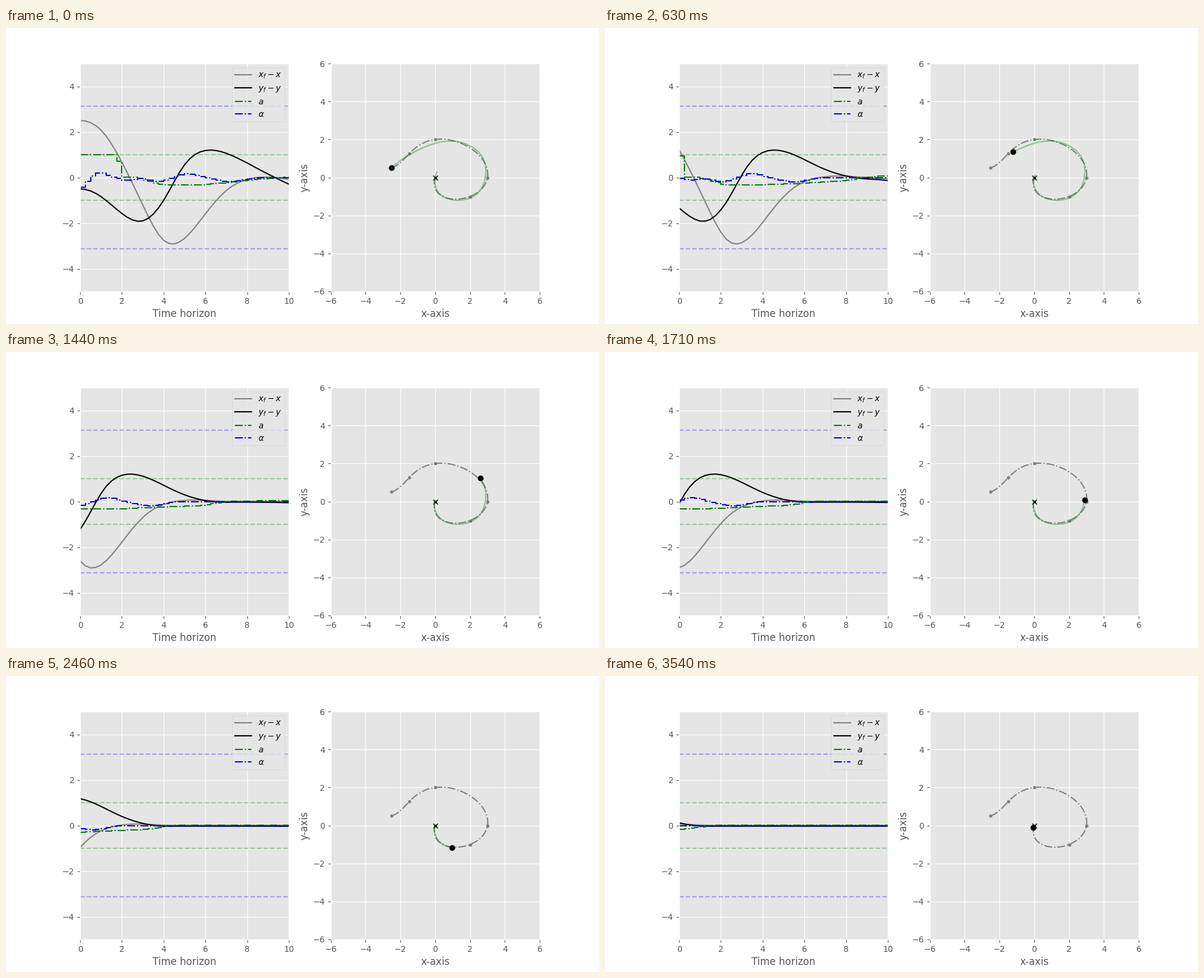
Animation of 1000x500 px, one loop 3.57 s. Source, as a matplotlib script:

```python
import numpy as np
import matplotlib.pyplot as plt
from matplotlib.animation import FuncAnimation

FRAMES, INTERVAL = 119, 30
SIM_STEP, PLAN_STEP, HORIZON = 0.08, 0.25, 10
LAUNCH_END = 1.92

plt.style.use("ggplot")
plt.rcParams["font.family"] = "DejaVu Sans"

WAYPOINTS = np.array([(-2.5, 0.5), (-1.5, 1.25), (0, 2), (3, 0), (2, -1), (0, 0)])

# Key positions of the driven path: time, x, y
KEYS = np.array([
    (0, -2.5, 0.5), (1, -2.08, 0.84), (2, -0.67, 1.58), (3, 1.21, 1.905),
    (4, 2.76, 1.0), (5, 2.67, -0.56), (6, 1.59, -1.185), (7, 0.57, -1.06),
    (8.4, 0, -0.46), (9.5, -0.06, -0.105), (11, 0, 0.03),
])

# Steering swings: height, time, width
SWINGS = [(-0.55, -0.1, 0.45), (0.23, 1, 0.4), (-0.13, 2.3, 0.45),
          (-0.19, 3.75, 0.6), (0.17, 5.2, 0.6), (-0.19, 7.2, 0.85)]


def ramp(t, start, end):
    return np.clip((t - start) / (end - start), 0, 1)


def ease(t, start, end):
    u = ramp(t, start, end)
    return u * u * (3 - 2 * u)


def reference_path(count=400):
    """Quintic through the waypoints, with chord length as parameter."""
    chords = np.hypot(*np.diff(WAYPOINTS, axis=0).T)
    u = np.concatenate([[0], np.cumsum(chords)])
    s = np.linspace(0, u[-1], count)
    return [np.polyval(np.polyfit(u, coord, 5), s) for coord in WAYPOINTS.T]


def rest_basis(t):
    """Cubic spline terms without a linear one, so motion starts from rest."""
    terms = [t ** 0, t ** 2, t ** 3]
    terms += [np.clip(t - knot, 0, None) ** 3 for knot in KEYS[1:-2, 0]]
    return np.stack(terms, axis=-1)


PATH_COEFFS = np.linalg.solve(rest_basis(KEYS[:, 0]), KEYS[:, 1:])


def position(t):
    return (rest_basis(np.minimum(t, KEYS[-1, 0])) @ PATH_COEFFS).T


def accel(t):
    """Full throttle, then braking that builds up and slowly eases off."""
    brake = 0.35 * ease(t, 2.4, 4.2) - 0.15 * ramp(t, 5.5, 9.6) - 0.195 * ramp(t, 9.6, 11.2)
    return np.where(t < LAUNCH_END, 1, 0.02 - brake)


def steer(t):
    return sum(h * np.exp(-((t - mid) / width) ** 2) for h, mid, width in SWINGS)


def interval_mean(control, t):
    """Mean of a control over the plan interval that starts at each t."""
    sub = (np.arange(20) + 0.5) / 20 * PLAN_STEP
    return control(t[:, None] + sub).mean(axis=1)


ahead = np.arange(0, HORIZON + PLAN_STEP / 2, PLAN_STEP)


def plan(now):
    """Predicted path and controls; early plans drift near the horizon's end."""
    t = now + ahead
    fade = np.exp(-now / 1.5)
    drift = fade * ramp(ahead, 7.8, HORIZON) ** 2
    x, y = position(t)
    a = interval_mean(accel, t) + 0.15 * fade * ramp(ahead, 6, 8.5)
    return x + 0.13 * drift, y + 0.31 * drift, a, interval_mean(steer, t)


fig, (ax_time, ax_path) = plt.subplots(1, 2, figsize=(10, 5), dpi=100)
fig.subplots_adjust(left=0.125, right=0.9, bottom=0.11, top=0.88, wspace=0.2)

ax_time.set(xlim=(0, HORIZON), ylim=(-5, 5), xlabel="Time horizon")
for limit, color in ((1, "green"), (np.pi, "blue")):
    for sign in (1, -1):
        ax_time.plot([0, HORIZON], [sign * limit] * 2, "--", color=color, alpha=0.3)

styles = [
    dict(color="gray", label="$x_f-x$"),
    dict(color="black", label="$y_f-y$"),
    dict(color="green", ls="-.", drawstyle="steps-post", label="$a$"),
    dict(color="blue", ls="-.", drawstyle="steps-post", label=r"$\alpha$"),
]
curves = [ax_time.plot([], [], **style)[0] for style in styles]
ax_time.legend(loc="upper right")

ax_path.set(xlim=(-6, 6), ylim=(-6, 6), xlabel="x-axis", ylabel="y-axis")
ax_path.plot(*reference_path(), "-.", color="gray")
ax_path.plot(*WAYPOINTS.T, ".", color="gray")
ax_path.plot(0, 0, "x", color="black")
predicted, = ax_path.plot([], [], color="green", alpha=0.4)
vehicle, = ax_path.plot([], [], "o", color="black")


def update(frame):
    x, y, a, alpha = plan(frame * SIM_STEP)
    for curve, values in zip(curves, (-x, -y, a, alpha)):
        curve.set_data(ahead, values)
    predicted.set_data(x, y)
    vehicle.set_data(x[:1], y[:1])
    return [*curves, predicted, vehicle]


anim = FuncAnimation(fig, update, frames=FRAMES, interval=INTERVAL, repeat=True)
plt.show()
```
